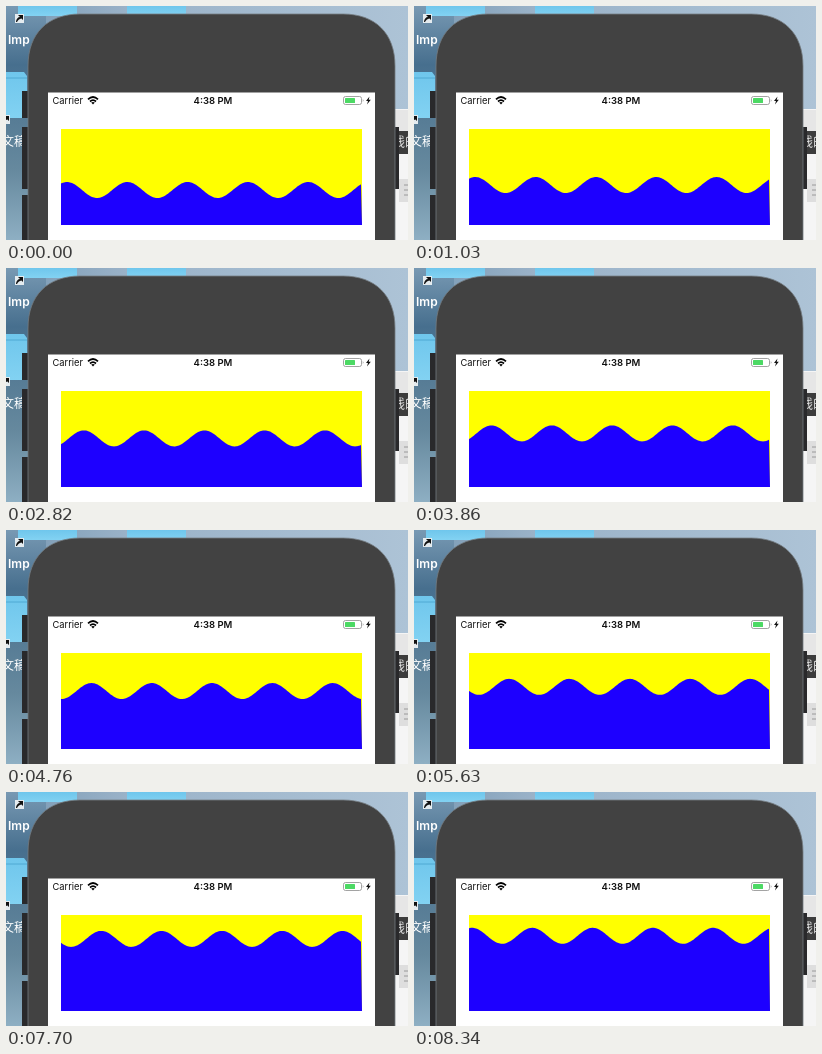
An HTML page that plays this animation: 402x234 px, repeating every 8440 ms.

```html
<!DOCTYPE html>
<html lang="en">
<head>
<meta charset="utf-8">
<title>Rising wave</title>
<style>
html, body { margin: 0; width: 100%; height: 100%; overflow: hidden; }
svg { display: block; width: 402px; height: 234px; }
text { font-family: Inter, Roboto, "Noto Sans CJK SC", "Noto Sans CJK", sans-serif; }
</style>
</head>
<body>
<svg viewBox="0 0 402 234">
  <defs>
    <linearGradient id="sky">
      <stop offset="0" stop-color="#7899b3"/>
      <stop offset=".3" stop-color="#9ab2c8"/>
      <stop offset="1" stop-color="#adc3d6"/>
    </linearGradient>
    <linearGradient id="side" x2="0" y2="1">
      <stop offset="0" stop-color="#7899b3"/>
      <stop offset=".25" stop-color="#476f8e"/>
      <stop offset=".5" stop-color="#587d96"/>
      <stop offset=".7" stop-color="#66899e"/>
      <stop offset="1" stop-color="#8eafc3"/>
    </linearGradient>
    <linearGradient id="folder" x2="0" y2="1">
      <stop offset="0" stop-color="#6fc6ec"/>
      <stop offset="1" stop-color="#82d2f2"/>
    </linearGradient>
    <g id="alias">
      <path d="M-4 -4H5V5H-4Z" fill="#e4ebef"/>
      <path d="M-3 4C-3 1-1-1 1-1L-1-3H4V2L2.500.5C0 1-1 2-2 4Z" fill="#111"/>
    </g>
  </defs>

  <!-- desktop -->
  <rect width="402" height="234" fill="url(#sky)"/>
  <rect width="40" height="234" fill="url(#side)"/>
  <path d="M12 0H71V10H12ZM121 0H180V8H121Z" fill="url(#folder)"/>
  <path d="M0 66H18L21 70V112H0Z" fill="url(#folder)"/>
  <path d="M0 72H21" stroke="#4fa9d3"/>
  <use href="#alias" x="13" y="12"/>
  <use href="#alias" x="-1" y="113"/>
  <g fill="#fff" font-size="12">
    <text x="2" y="38" font-weight="600">Imp</text>
    <text x="-4" y="140" font-weight="500">文稿</text>
  </g>
  <path d="M386 103H402V234H386Z" fill="#f5f5f5"/>
  <path d="M386 104H402V125H386Z" fill="#e6e6e6"/>
  <path d="M386 125H402V148H386Z" fill="#3c3c3c"/>
  <text x="386" y="140" font-size="13" fill="#ddd">线的</text>
  <path d="M393 173H402V196H393Z" fill="#dedede"/>
  <path d="M398 179H402M398 184H402M398 189H402" stroke="#999"/>

  <!-- phone -->
  <path d="M16 85H24V112H16ZM16 121H24V183H16ZM16 189H24V234H16ZM387 121H393V183H387Z" fill="#29292b"/>
  <path d="M22 240V60C22 27 42 8 74 8H337C369 8 389 27 389 60V240Z" fill="#424242" stroke="#747b80" stroke-width=".8"/>
  <rect x="42" y="86.500" width="327" height="148" fill="#fff"/>

  <!-- status bar -->
  <text x="46.500" y="98" font-size="9.300" fill="#111">Carrier</text>
  <text x="207" y="98" font-size="9.500" font-weight="600" text-anchor="middle" fill="#111">4:38 PM</text>
  <g fill="none" stroke="#000" stroke-width="1.700">
    <path d="M82 93.300Q87 88.700 92 93.300M84 95.500Q87 92.800 90 95.500"/>
    <path d="M85.200 96.600Q87 95.200 88.800 96.600L87 98.600Z" fill="#000" stroke="none"/>
  </g>
  <rect x="337.500" y="90.500" width="18" height="8" rx="2" fill="#fff" stroke="#8c8c8c" stroke-width=".8"/>
  <rect x="339" y="92" width="10" height="5" rx=".6" fill="#4cd964"/>
  <path d="M356.800 93Q358.300 94.500 356.800 96Z" fill="#8c8c8c"/>
  <path d="M363.500 90.500L360 95H362L361 98.500L364.800 93.800H362.700Z" fill="#111"/>

  <!-- tank -->
  <rect x="55" y="123" width="301" height="96" fill="#ff0"/>
  <path id="wave" fill="#1d00ff"/>
</svg>
<script>
const LOOP = 8440, LEFT = 55, RIGHT = 355, BOTTOM = 219;
const LENGTH = 60.3, HEIGHT = 8;
// runs of evenly spaced updates: first, last, count
const RUNS = [
  [140, 1180, 8], [1330, 2370, 8], [2520, 3420, 7], [3570, 4610, 8],
  [4760, 5780, 8], [5930, 6960, 8], [7110, 8150, 8], [8340, 8340, 1]
];
const ticks = [0];
for (const [first, last, n] of RUNS)
  for (let i = 0; i < n; i++)
    ticks.push(Math.floor((first + (last - first) * i / Math.max(1, n - 1)) / 10) * 10);

const wave = document.getElementById('wave');

function draw(now) {
  const time = now % LOOP;
  const t = ticks.findLast(tick => tick <= time);
  const crest = 61 - 0.0582 * t, level = 184 - 0.00482 * t;
  let d = `M${LEFT} ${BOTTOM}`;
  for (let x = LEFT; x <= RIGHT; x++) {
    const y = level - HEIGHT * Math.cos(2 * Math.PI * (x - crest) / LENGTH);
    d += `L${x} ${y.toFixed(2)}`;
  }
  wave.setAttribute('d', `${d}L${RIGHT + 1} ${BOTTOM}Z`);
}

const start = performance.now();
function loop() {
  draw(performance.now() - start);
  requestAnimationFrame(loop);
}
loop();
</script>
</body>
</html>
```
